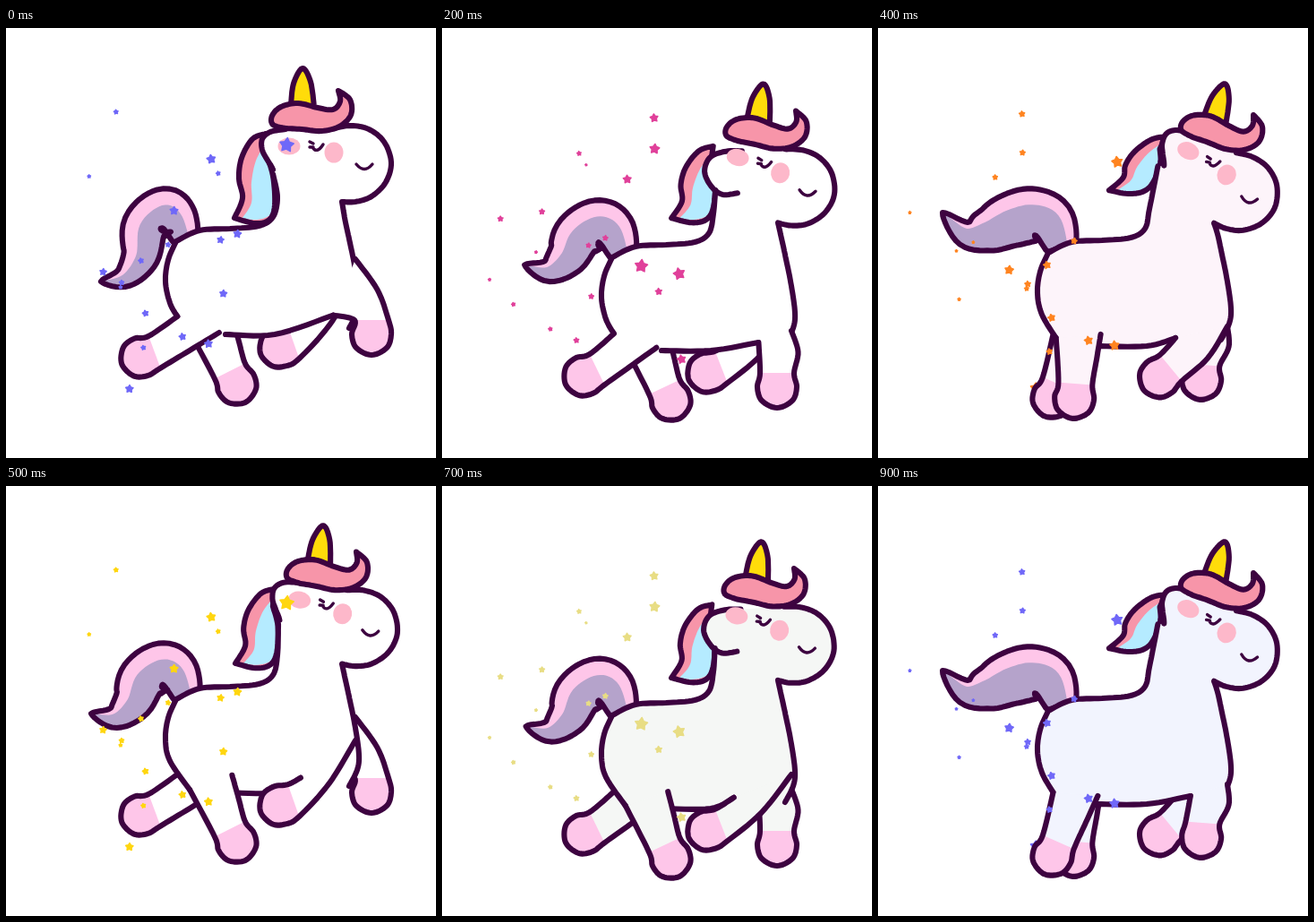
An HTML page that plays this animation: 480x480 px, repeating every 1 s.

```html
<!DOCTYPE html>
<html lang="en">
<head>
<meta charset="utf-8">
<title>Galloping unicorn</title>
<style>
html, body { margin: 0; width: 100%; height: 100%; overflow: hidden; background: #fff; }
svg { display: block; width: 100%; height: 100%; }
.pose { visibility: hidden; animation: show 1s step-end infinite; }
@keyframes show { 0% { visibility: visible; } 10%, 100% { visibility: hidden; } }
.ink { stroke: #3d0340; stroke-width: 6.1; stroke-linecap: round; stroke-linejoin: round; }
.thin { stroke-width: 3.4; }
.star { stroke-width: 1.6; stroke-linejoin: round; }
</style>
</head>
<body>
<svg id="stage" viewBox="0 0 480 480"></svg>
<script>
const PINK = '#fec6e9', LILAC = '#b5a3cb', ROSE = '#f795a9', SKY = '#b5ebff', GOLD = '#ffdc0a', BLUSH = '#fdb8ca';
const GLOW = ['#6f68f8', '#a259d9', '#e0409a', '#ff2a3c', '#ff8420', '#ffd60f', '#f4d945', '#e8dd84', '#ada5bd', '#7068f8'];
const TINT = { 4: '#fdf4fa', 7: '#f5f7f5', 8: '#f6f7f9', 9: '#f2f4fe' };
const STEPS = 10, HALF = 5, DEG = Math.PI / 180, PIVOT = 375;

const pairs = s => s.split(',').map(p => p.trim().split(' ').map(Number));
const blend = (a, b, w) => a.map((p, i) => p.map((v, c) => v + (b[i][c] - v) * w));

// Gait keys: the far legs run the same track half a loop later.
const BACK = [225, 235, 243, 249, 238];
const NOD = [0, 2, 12, 23, 24, 10, 6, 11, 20, 24];
const DROOP = [0, .4, 1, 1, 0];
const HIND = pairs('149 368, 153 382, 157 389, 176 408, 219 415, 258 399, 257 411, 256 417, 238 424, 194 414');
const FORE = pairs('408 344, 389 379, 374 403, 340 418, 313 391, 304 357, 304 374, 295 385, 304 402, 361 394');

// Head parts are relative to the throat, the others to the back line.
const MUZZLE = pairs('-9 -82, 10 -85, 30 -81, 47 -67, 55 -44, 49 -22, 33 -6, 15 0, 0 0');
const NAPE = pairs('-77 -36, -79 -40, -84 -48, -89 -58, -89 -70, -80 -78, -63 -81');
const NAPE_LOW = pairs('-51 -23, -67 -18, -81 -24, -92 -39, -89 -56, -73 -66, -56 -70');
const CHEST = pairs('379 -8, 384 15, 390 45, 394 75, 392 92, 383 110');
const RUMP = pairs('183 82, 178 58, 181 34, 190 13');
const SPINE = pairs('190 13, 216 1, 250 -1, 282 -4, 298 -14, 303 -36');
const CURL = pairs('201 11, 191 -14, 176 -21, 155 -3, 150 30, 132 53, 106 58');
const FLOW = pairs('205 7, 194 -22, 172 -29, 147 -23, 122 -12, 97 -9, 72 -32');
const LOCK = ['290 -107, 275 -101, 263 -80, 260 -57, 264 -35, 255 -13', '255 -13, 278 -7, 294 -11, 300 -27, 298 -60, 290 -85'].map(pairs);
const STREAK = ['289 -95, 279 -77, 274 -53, 274 -30, 264 -13', '264 -13, 280 -11, 295 -17, 298 -35, 296 -65'].map(pairs);
const HORN = pairs('-22 -14, -19 -38, -9 -55, 0 -40, 4 -12');
const HAIR = ['-28 12, -42 8, -43 -2, -33 -12, -14 -16, 8 -11, 25 -9, 33 -18, 31 -30', '31 -30, 44 -20, 45 -3, 32 10, 12 15, -10 13, -28 12'].map(pairs);
const HOOF = pairs('-18 19, -2 22, 13 17, 21 0, 13 -17, -2 -22, -18 -19');

// Smooth curve through all points.
function smooth(p, n = 8) {
  const out = [], at = i => p[Math.max(0, Math.min(p.length - 1, i))];
  for (let k = 0; k <= n * (p.length - 1); k++) {
    const i = Math.min(Math.floor(k / n), p.length - 2), t = k / n - i;
    out.push([0, 1].map(c => {
      const [a, b, d, e] = [at(i - 1)[c], at(i)[c], at(i + 1)[c], at(i + 2)[c]];
      return b + t / 2 * (d - a + t * (2 * a - 5 * b + 4 * d - e + t * (3 * (b - d) + e - a)));
    }));
  }
  return out;
}

const line = pts => 'M' + pts.map(p => p.map(v => v.toFixed(1)).join(' ')).join('L');
const path = (d, fill = 'none', cls = 'ink') => `<path class="${cls}" d="${d}" fill="${fill}"/>`;
const fillOf = (pts, color) => path(line(pts) + 'Z', color, '');
const patch = (outer, inner, base, top) =>
  fillOf(outer, base) + fillOf(inner, top) + path(line(outer) + 'Z');
const place = (x, y, turn, s) => `<g transform="translate(${x} ${y}) rotate(${turn})">${s}</g>`;

let clips = 0;
function limb(rear, front, [x, y], turn, bow, coat) {
  const sin = Math.sin(turn), cos = Math.cos(turn);
  const at = ([a, s]) => [x - a * sin - s * cos, y + a * cos - s * sin];
  const end = at(HOOF[HOOF.length - 1]);
  const knee = [(end[0] + front[0]) / 2 + bow * cos, (end[1] + front[1]) / 2 + bow * sin];
  const d = line(smooth([rear, ...HOOF.map(at), knee, front])), id = 'leg' + clips++;
  const tip = [[-18, 60], [60, 60], [60, -60], [-18, -60]].map(at);
  const svg = `<clipPath id="${id}"><path d="${d}Z"/></clipPath>` + path(d + 'Z', coat, '') +
    `<g clip-path="url(#${id})">${fillOf(tip, PINK)}</g>` + path(d);
  return { rear, svg };
}

function hindLeg(back, [x, y], coat) {
  const tilt = (206 - x) * .37 * DEG, cx = 222 + (x - 206) * .13, cy = back + 106;
  const dx = 25 * Math.cos(tilt), dy = 25 * Math.sin(tilt);
  return limb([cx - dx, cy - dy], [cx + dx, cy + dy], [x, y], Math.atan2(cx - x, y - cy) * 1.15, 0, coat);
}

function foreLeg(back, [x, y], coat) {
  const lift = Math.max(0, 150 - (y - back));
  const rear = [345 + (x - 350) * .35, back + 108 - lift * .4], front = [390, back + 95 - lift * 2];
  const turn = Math.max(0, Math.atan2(365 - x, y - back - 85)) * 1.35;
  return limb(rear, front, [x, y], turn, 6, coat);
}

// Tapered ribbon around a spine; the shaded part hugs the inner edge.
function tail(back, sway) {
  const mid = smooth(blend(CURL, FLOW, sway).map(([x, y]) => [x, y + back]));
  const last = mid.length - 1;
  const edge = side => mid.map(([x, y], i) => {
    const a = mid[Math.max(0, i - 1)], b = mid[Math.min(last, i + 1)];
    const tx = b[0] - a[0], ty = b[1] - a[1], len = Math.hypot(tx, ty);
    const w = side * (25 + 5 * sway) * Math.max(0, Math.sin(Math.PI * (.17 + .83 * i / last))) ** .9;
    return [x - ty / len * w, y + tx / len * w];
  });
  const inner = edge(-1).reverse();
  return patch([...edge(1), ...inner], [...edge(.25 + .15 * sway), ...inner], PINK, LILAC);
}

function mane(back, sway) {
  const swing = ([x, y]) => [x + sway * (3 - .3 * (y + 13)), back + y - sway * (10 + .36 * (y + 107))];
  const shape = parts => parts.flatMap(p => smooth(p.map(swing)));
  return patch(shape(LOCK), shape(STREAK), ROSE, SKY);
}

function face(nod) {
  const cheek = (x, y, rx, ry) => `<ellipse cx="${x}" cy="${y}" rx="${rx}" ry="${ry}" fill="${BLUSH}"/>`;
  const mark = (x, y, d) => place(x, y, -nod * .6, path(d, 'none', 'ink thin'));
  return cheek(-59, -62, 12.5, 9.5) + cheek(-9, -55, 10.5, 11.5) +
    mark(-28, -62, 'M-8 -5l4 2M-8 1l4 0M-5 1q5 8 12 -3') + mark(25, -41, 'M-9 -1q9 11 18 0') +
    place(-35, -94, -nod * .36, path(line(smooth(HORN)) + 'Z', GOLD) +
      path(line(HAIR.flatMap(p => smooth(p))) + 'Z', ROSE));
}

// Sparks leave the unicorn, drift left and shrink; each lives half a loop.
const rand = n => { const v = Math.sin(n * 127.1 + 31.7) * 43758.5453; return v - Math.floor(v); };

function star(x, y, r, tilt) {
  const pts = [];
  for (let k = 0; k < 10; k++) {
    const a = k * Math.PI / 5 - Math.PI / 2 + tilt, q = k % 2 ? r * .56 : r;
    pts.push([x + q * Math.cos(a), y + q * Math.sin(a)]);
  }
  return line(pts) + 'Z';
}

function sparks(step) {
  const layers = ['', ''];
  for (let k = 0; k < 21; k++) {
    const [u, v, size, phase, veer] = [1, 2, 3, 4, 5].map(n => rand(k * 5 + n));
    const age = (step / HALF + phase) % 1;
    layers[k % 5 ? 1 : 0] += star(210 + 170 * u - 190 * age, 90 + 330 * v + 50 * (veer - .5) * age,
      (4 + 14 * size ** 3) * (1 - .75 * age), (veer - .5) * .5);
  }
  return layers.map(d => `<path class="star" d="${d}" fill="${GLOW[step]}" stroke="${GLOW[step]}"/>`);
}

function draw(_, step) {
  const back = BACK[step % HALF], nod = NOD[step], droop = DROOP[step % HALF];
  const sway = (nod / 24) ** 1.3, coat = TINT[step] || '#fff', far = (step + HALF) % STEPS;
  const throat = back - 31 + nod * .45, cos = Math.cos(nod * DEG), sin = Math.sin(nod * DEG);
  const onHead = ([x, y]) => [PIVOT + x * cos - y * sin, throat + x * sin + y * cos];
  const onBody = ([x, y]) => [x, back + y];
  const hind = hindLeg(back, HIND[step], coat), fore = foreLeg(back, FORE[step], coat);
  const neckTop = [298 + nod * .6, back - 62 - (1 - droop) * nod * .9];
  const outline = [
    [...smooth(MUZZLE.map(onHead)), ...smooth([[PIVOT, throat], ...CHEST.map(onBody)])],
    smooth([fore.rear, ...[[300, 117], [245, 117]].map(onBody)]),
    [...smooth([hind.rear, ...RUMP.map(onBody)]), ...smooth([...SPINE.map(onBody), neckTop])],
    smooth(blend(NAPE, NAPE_LOW, droop).map(onHead))];
  const [behind, front] = sparks(step);
  return `<g class="pose" style="animation-delay:${step * 100 - 1000}ms">` + behind +
    tail(back, sway) + mane(back, sway) +
    hindLeg(back, HIND[far], coat).svg + foreLeg(back, FORE[far], coat).svg +
    fillOf(outline.flat(), coat) + outline.map(s => path(line(s))).join('') +
    hind.svg + fore.svg + place(PIVOT, throat, nod, face(nod)) + front + '</g>';
}

document.getElementById('stage').innerHTML = Array.from({ length: STEPS }, draw).join('');
</script>
</body>
</html>
```
